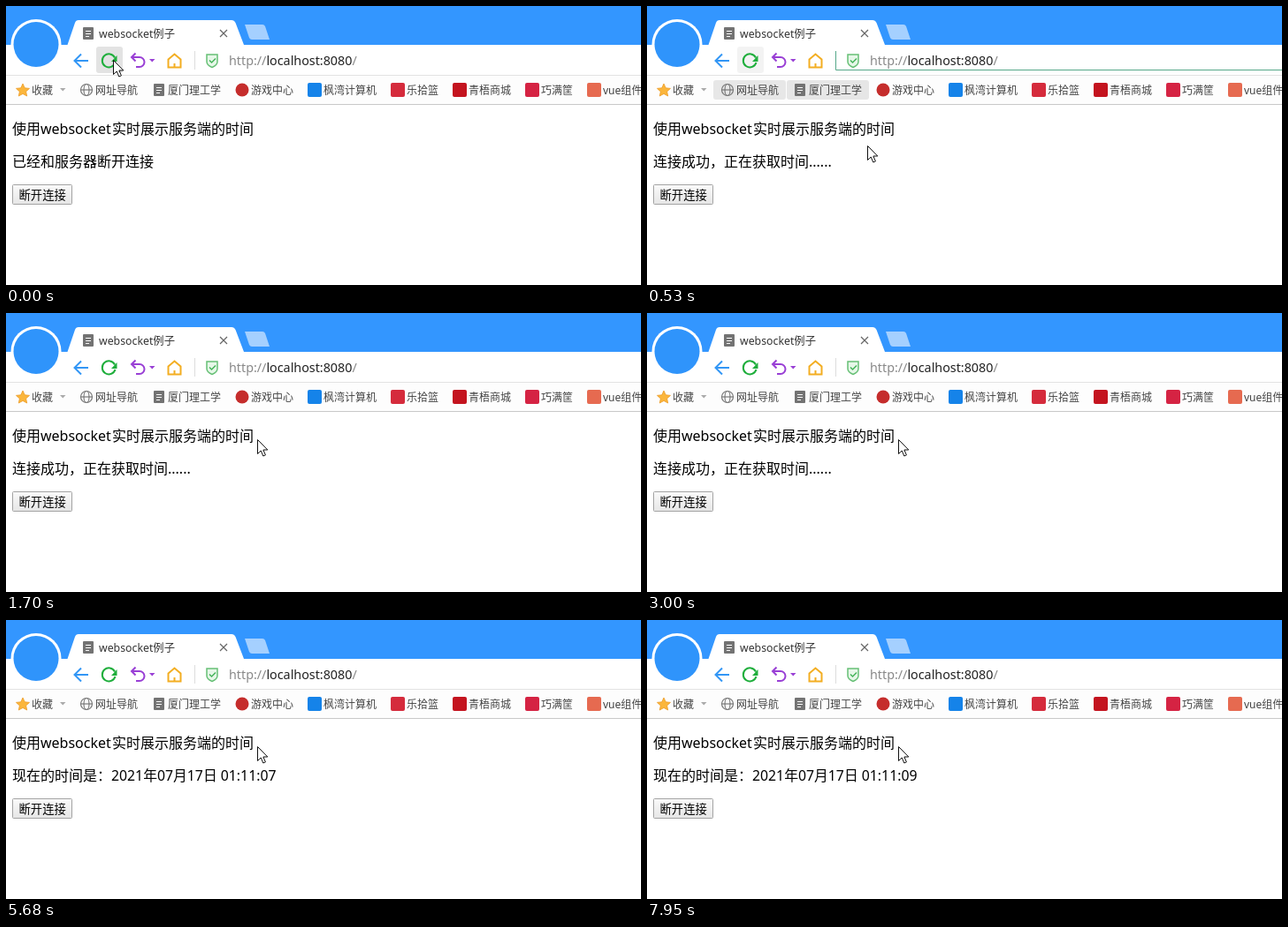
An HTML page for the animation above (8 s loop, 718 px wide and 316 px high).

```html
<!DOCTYPE html>
<html lang="zh-CN">
<head>
<meta charset="utf-8">
<title>websocket例子</title>
<style>
  html, body { margin: 0; width: 100%; height: 100%; overflow: hidden; background: #fff; }
  svg { display: block; width: 100%; height: 100%; }
  text { font-family: "Noto Sans", "Noto Sans CJK SC", "Noto Sans CJK", sans-serif; white-space: pre; }
  .page { font-size: 16px; }
  .bar { font-size: 12px; fill: #444; }
  .line { fill: none; stroke-width: 2; }
</style>
</head>
<body>
<svg viewBox="0 0 718 316">
  <defs>
    <linearGradient id="face" x2="0" y2="1">
      <stop stop-color="#fafafa"/><stop offset="1" stop-color="#e6e6e6"/>
    </linearGradient>
    <g id="doc">
      <rect width="12" height="14" rx="1" fill="#737373"/>
      <path d="M3 4.5h6M3 7.5h6M3 10.5h4" stroke="#fff"/>
    </g>
  </defs>

  <!-- Title bar and tab -->
  <rect width="718" height="44" fill="#3396ff"/>
  <path d="M69.500 44L78 19Q79 16 82 16H255Q258 16 259.500 19L269 44Z" fill="#fff"/>
  <path d="M270 21H290Q292 21 293 23L298 38H278Q276 38 275 36Z" fill="#a5d0ff"/>
  <use href="#doc" x="87" y="24"/>
  <text x="105" y="35.500" font-size="12.300" fill="#333">websocket例子</text>
  <path d="M242 27l8 8m0-8l-8 8" stroke="#666" stroke-width="1.200"/>

  <!-- Toolbar -->
  <path d="M0 78.500H718" stroke="#e2e2e2"/>
  <circle cx="34" cy="43.500" r="28.500" fill="#fff"/>
  <circle cx="34" cy="43.500" r="25.500" fill="#2f94fb"/>
  <rect id="reloadHover" x="102" y="46" width="30" height="30" rx="3" fill="#e3e3e3"/>
  <path class="line" d="M93 62H78M85 54.500L77.500 62L85 69.500" stroke="#3296f5"/>
  <path class="line" d="M123 58.500A7.500 7.500 0 1 0 123.500 64" stroke="#1fae3c" stroke-width="2.200"/>
  <path d="M125.500 56v7h-6.500z" fill="#1fae3c"/>
  <path class="line" d="M146.500 53.500L142 58L146.500 62.500M142.500 58H151A5.300 5.300 0 0 1 151 69H147" stroke="#993fd5"/>
  <path d="M162 60h6.500l-3.250 3.500z" fill="#993fd5"/>
  <path class="line" d="M183.500 60.500L190.500 54.500L197.500 60.500V69.500H183.500ZM190.500 65V69" stroke="#f3ae22"/>
  <path d="M213.500 51V72" stroke="#ddd"/>
  <path id="addressHover" d="M213.500 51V72.500H718" fill="none" stroke="#55a789"/>
  <path d="M227 55H239V63Q239 67 233 69.500Q227 67 227 63Z" fill="#e6f7e8" stroke="#67c076" stroke-width="1.500"/>
  <path d="M230 61.500l2.500 2.500l4.500-4.500" fill="none" stroke="#45b35a" stroke-width="1.500"/>
  <text x="252" y="67" font-size="14.300" fill="#888">http://<tspan fill="#222">localhost:8080</tspan>/</text>

  <!-- Bookmarks -->
  <rect y="79" width="718" height="32" fill="#fdfdfd"/>
  <path d="M0 111.500H718" stroke="#c9c9c9"/>
  <rect id="navHover" x="75" y="84" width="82" height="22" rx="3" fill="#e6e6e6"/>
  <rect id="schoolHover" x="158" y="84" width="93" height="22" rx="3" fill="#e6e6e6"/>
  <path d="M19 88l2.200 4.800l5.300.600l-3.900 3.500l1.100 5.100l-4.700-2.600l-4.700 2.600l1.100-5.100l-3.900-3.500l5.300-.600z" fill="#fbb63c" stroke="#ed9b25" stroke-width=".8"/>
  <path d="M61 93h6.500l-3.250 3.500z" fill="#aaa"/>
  <g fill="none" stroke="#777" stroke-width="1.200">
    <circle cx="91" cy="95" r="6.500"/><ellipse cx="91" cy="95" rx="3" ry="6.500"/>
    <path d="M84.500 95h13"/>
  </g>
  <use href="#doc" x="167" y="88"/>
  <circle cx="267" cy="95" r="7.500" fill="#c52d2c"/>
  <g id="bookmarks"></g>

  <!-- Page -->
  <g class="page">
    <text x="7" y="145">使用websocket</text>
    <text x="120" y="145">实时展示服务端的时间</text>
    <text id="status" x="7" y="182"></text>
    <text id="clock" x="119" y="182" font-size="15.800"></text>
  </g>
  <rect x="7.500" y="202.500" width="67" height="22" rx="1" fill="url(#face)" stroke="#a3a3a3"/>
  <text x="14.500" y="218.500" font-size="13.333">断开连接</text>

  <g id="tooltip">
    <rect x="121.500" y="79.500" width="86" height="41" fill="#fff" fill-opacity=".4" stroke="#e4e4e4"/>
    <g font-size="12" fill="#c4c4c4">
      <text x="125" y="95">刷新</text><text x="125" y="113">鼠标手势: 下上</text>
    </g>
  </g>
  <path id="cursor" d="M.5 .5V16.500L4.200 13L6.800 19L9.400 17.900L6.900 12H11.800Z" fill="#fff" stroke="#111"/>
</svg>
<script>
  const LOOP = 8000;
  const $ = id => document.getElementById(id);
  const clamp = v => Math.max(0, Math.min(1, v));

  const labels = [[29, '收藏'], [101, '网址导航'], [183, '厦门理工学'], [277, '游戏中心'],
    [359, '枫湾计算机', '#1583e9'], [453, '乐拾篮', '#d52b3c'], [523, '青梧商城', '#c4141f'],
    [605, '巧满筐', '#d52343'], [675, 'vue组件', '#e66a50']];
  $('bookmarks').innerHTML = labels.map(([x, name, color]) =>
    (color ? `<rect x="${x - 18}" y="87" width="16" height="16" rx="2" fill="${color}"/>` : '') +
    `<text class="bar" x="${x}" y="100">${name}</text>`).join('');

  // Pointer path: time, x, y
  const path = [[0, 121, 61], [120, 119, 61], [400, 119, 61], [530, 249, 158],
    [730, 269, 168], [970, 269, 168], [1090, 284, 143], [LOOP, 284, 143]];
  const ticks = [3450, 4460, 5470, 6530, 7540];

  function pointer(t) {
    const i = path.findIndex(p => p[0] > t);
    const [t0, x0, y0] = path[i - 1], [t1, x1, y1] = path[i];
    const k = (t - t0) / (t1 - t0);
    return [x0 + (x1 - x0) * k, y0 + (y1 - y0) * k].map(Math.round);
  }

  function message(t) {
    if (t < 440) return ['已经和服务器断开连接', ''];
    const count = ticks.filter(tick => tick <= t).length;
    return count ? ['现在的时间是：', `2021年07月17日 01:11:0${4 + count}`] : ['连接成功，正在获取时间......', ''];
  }

  // Full strength from on to off, then a linear fade
  const glow = (t, on, off, fade = 200) => t < on ? 0 : clamp(1 - (t - off) / fade);
  const fadeTo = (id, opacity) => $(id).setAttribute('opacity', opacity);

  function draw(t) {
    $('cursor').setAttribute('transform', `translate(${pointer(t)})`);
    [$('status').textContent, $('clock').textContent] = message(t);
    fadeTo('reloadHover', glow(t, 0, 420));
    fadeTo('addressHover', glow(t, 420, 560, 170));
    fadeTo('navHover', glow(t, 440, 520));
    fadeTo('schoolHover', glow(t, 460, 530));
    fadeTo('tooltip', t < 400 ? clamp((t - 200) / 150) : 0);
  }

  const start = performance.now();
  function frame() {
    draw((performance.now() - start) % LOOP);
    requestAnimationFrame(frame);
  }
  frame();
</script>
</body>
</html>
```
